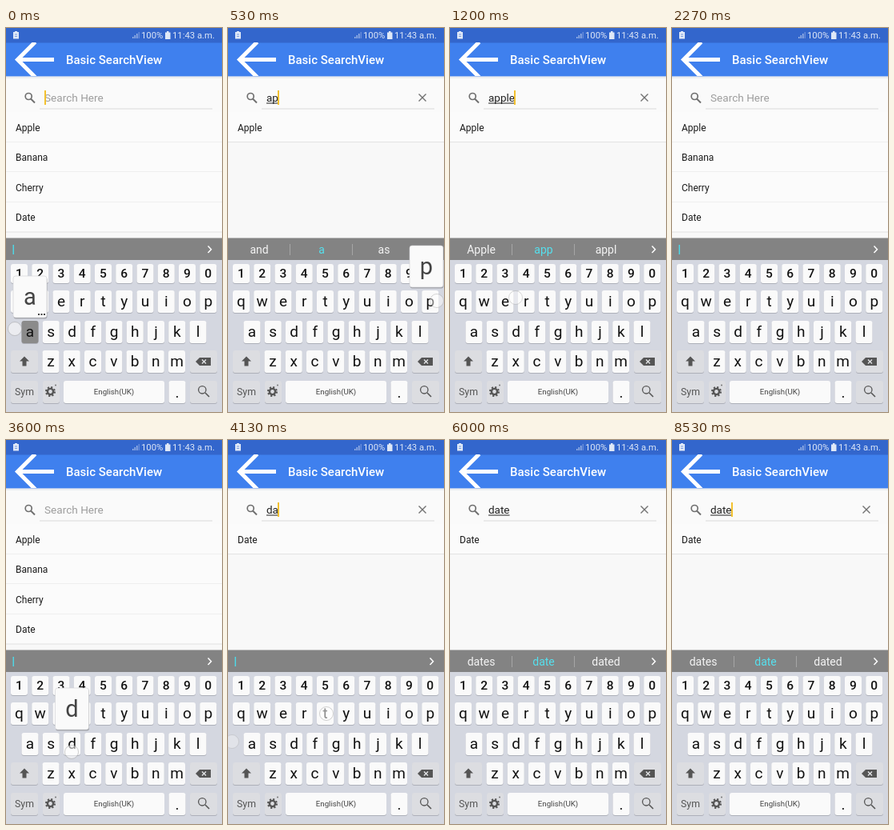
Write an HTML page that moves like this. It is 270 by 480 pixels and loops after 8790 ms.

```html
<!DOCTYPE html>
<html lang="en">
<head>
<meta charset="utf-8">
<title>Basic SearchView</title>
<style>
  html, body { margin: 0; width: 100%; height: 100%; overflow: hidden; background: #fafafa; }
  svg { display: block; width: 270px; height: 480px; font-family: Roboto, sans-serif; }
  .mid { text-anchor: middle; }
  .line { fill: none; stroke-linecap: butt; }
</style>
</head>
<body>
<svg id="stage" viewBox="0 0 270 480">
  <rect width="270" height="480" fill="#f8f8f8"/>
  <rect y="60" width="270" height="82" fill="#fafafa"/>
  <g id="rows" font-size="12" fill="#1c1c1c"></g>

  <rect y="60" width="270" height="1" fill="#a9c2ee"/>
  <rect y="61" width="270" height="2" fill="#eceef1"/>
  <rect y="18" width="270" height="42" fill="#3f80ee"/>
  <rect width="270" height="18.500" fill="#3366cc"/>
  <path class="line" d="M36.500 17.500 L14.500 39.500 L36.500 61.500 M14.500 39.500 H60" stroke="#fff" stroke-width="5" clip-path="url(#bar)"/>
  <clipPath id="bar"><rect y="18" width="270" height="42"/></clipPath>
  <text x="75" y="45" font-size="15" font-weight="500" fill="#fff">Basic SearchView</text>

  <g fill="#dfe8f7" font-size="11.3">
    <path d="M9 5h2v-1h3v1h2v8.500h-7z"/>
    <path d="M11 8h3M11 10.500h3" stroke="#7f9fdf"/>
    <g opacity=".6">
      <path d="M158 13v-2h1.500v2zM160.500 13v-4h1.500v4zM163 13v-6h1.500v6z"/>
      <path d="M165.500 13v-8h1.500v8z" opacity=".5"/>
    </g>
    <text x="169" y="12.700">100%</text>
    <path d="M199 5.500h2v-1.500h2.500v1.500h2v8.500h-6.500z"/>
    <text x="208" y="12.700">11:43 a.m.</text>
  </g>

  <g class="line" stroke="#707070" stroke-width="1.7">
    <circle cx="28.200" cy="85.500" r="4"/>
    <path d="M31 88.500 L36 93.500" stroke-width="2"/>
    <path id="clear" d="M238.500 82.500l9 9m0-9l-9 9" stroke-width="1.400"/>
  </g>
  <rect x="42" y="100.500" width="216" height="1" fill="#dcdcdc"/>
  <text id="hint" x="48" y="92" font-size="13.6" fill="#9d9d9d">Search Here</text>
  <text id="query" x="48" y="92" font-size="13.5" fill="#222"></text>
  <rect id="under" x="48" y="93.500" height="1" fill="#222"/>
  <rect id="caret" y="78" width="2" height="18" fill="#f3c12f"/>

  <rect y="262.500" width="270" height="28" fill="#838383"/>
  <rect id="mark" x="8.500" y="271" width="1.500" height="12" fill="#4fd6e4"/>
  <g id="words" font-size="14" fill="#f4f4f4" class="mid">
    <path d="M77.500 270v14M155.500 270v14" stroke="#a5a5a5"/>
    <text x="39" y="282"></text>
    <text x="117" y="282" fill="#55e0ee"></text>
    <text x="195" y="282"></text>
  </g>
  <path class="line" d="M252.500 272.500l4 4.200-4 4.200" stroke="#fff" stroke-width="1.500"/>
  <rect y="290" width="270" height="190" fill="#d4d7e0"/>
  <g id="keys"></g>

  <g id="popup">
    <rect x=".5" y="1.500" width="42" height="52" rx="3" fill="#000" opacity=".25"/>
    <rect width="42" height="52" rx="3" fill="#fafafa" stroke="#cfcfd2" stroke-width=".6"/>
    <text class="mid" x="21" y="36" font-size="29" fill="#444"></text>
    <path id="dots" d="M31 48h2m1.500 0h2m1.500 0h2" stroke="#444" stroke-width="2"/>
  </g>
  <circle id="touch" r="8.500" fill="#fff" fill-opacity=".55" stroke="#9a9a9a" stroke-opacity=".6" stroke-width=".8"/>
  <circle id="trail" cx="5" cy="377" r="8.500" fill="#fff" fill-opacity=".3" stroke="#9a9a9a" stroke-opacity=".35" stroke-width=".8"/>
</svg>
<script>
const LOOP = 8790, PITCH = 26.25;
const $ = id => document.getElementById(id);

function add(parent, tag, attrs, text = '') {
  const el = document.createElementNS('http://www.w3.org/2000/svg', tag);
  for (const name in attrs) el.setAttribute(name, attrs[name]);
  el.textContent = text;
  parent.append(el);
  return el;
}

// Keyboard
const keys = {};
function key(label, cx, top, { w = 21, h = 28, size = 19, dy = 19.5, fill = '#fafafa', ink = '#111', weight = 400 } = {}) {
  const box = { x: cx - w / 2, width: w, height: h, rx: 3 };
  add($('keys'), 'rect', { ...box, y: top + 1, fill: '#adb0b9' });
  const face = add($('keys'), 'rect', { ...box, y: top, fill });
  add($('keys'), 'text', {
    class: 'mid', x: cx, y: top + dy, 'font-size': size, 'font-weight': weight, fill: ink
  }, label);
  keys[label] = { cx, top, face };
}
function keyRow(labels, x, top, style) {
  [...labels].forEach((c, i) => key(c, x + i * PITCH, top, style));
}
const grey = { fill: '#dcdde1', ink: '#555' };
keyRow('1234567890', 16.5, 295, { h: 24, size: 15.5, dy: 17, weight: 500 });
keyRow('qwertyuiop', 16.5, 328);
keyRow('asdfghjkl', 30, 366);
keyRow('zxcvbnm', 56, 403);
key('', 23, 403, { w: 34, ...grey });
key('', 247, 403, { w: 34, ...grey });
key('Sym', 23, 441, { w: 34, size: 12.3, dy: 17.5, ...grey });
key('', 56.5, 441, grey);
key('English(UK)', 135, 441, { w: 126, size: 9.7, dy: 17, ink: '#444' });
key('.', 214, 441, { dy: 20.5 });
key('', 247, 441, { w: 34, ...grey });

const icon = (d, attrs) => add($('keys'), 'path', { d, fill: 'none', stroke: '#555', ...attrs });
icon('M23 410.500l6 6h-3.500v6h-5v-6h-3.500z', { fill: '#555', stroke: 'none' });
icon('M237 417l5-5h14v10h-14z', { fill: '#555', stroke: 'none' });
icon('M245 414.500l5 5m0-5l-5 5', { stroke: '#e4e5e8', 'stroke-width': 1.3 });
icon('M249 456l5 5', { 'stroke-width': 1.6 });
const ring = (cx, cy, r, attrs) => add($('keys'), 'circle', { cx, cy, r, fill: 'none', stroke: '#555', ...attrs });
ring(245.3, 452.3, 4.7, { 'stroke-width': 1.3 });
ring(55.5, 454.5, 3.6, { 'stroke-width': 2.4 });
ring(55.5, 454.5, 5.5, { 'stroke-width': 2, 'stroke-dasharray': 2.16 });
ring(62, 446.5, 1, { fill: '#777', stroke: 'none' });

// Result rows, filtered by prefix
const fruits = ['Apple', 'Banana', 'Cherry', 'Date'];
function showRows(query) {
  $('rows').replaceChildren();
  fruits.filter(f => f.toLowerCase().startsWith(query)).forEach((f, i) => {
    const y = 105 + i * 37.5;
    add($('rows'), 'rect', { y, width: 270, height: 37, fill: '#fbfbfb' });
    add($('rows'), 'rect', { y: y + 37, width: 270, height: 1, fill: '#e3e3e3' });
    add($('rows'), 'text', { x: 12, y: y + 23.5 }, f);
  });
}

// Timelines: [start, value]
const typed = [[0, ''], [200, 'a'], [500, 'ap'], [800, 'app'], [1000, 'appl'], [1150, 'apple'],
  [1930, ''], [3730, 'd'], [4000, 'da'], [4330, 'dat'], [4600, 'date']];
const hints = [[0, ''], [330, 'and a as'], [870, 'Apple app appl'], [1470, 'apples apple applied'],
  [2230, ''], [4400, 'day da days'], [4730, 'dates date dated']];
const blink = [0, 1600, 1930, 2230, 2800, 3270, 3670, 5200, 5670, 6000, 6270, 6800, 7270, 7800, 8330];

// Taps: label, down, popup gone, touch gone, x, y
const taps = [
  ['a', 0, 130, 200, 11, 376], ['p', 470, 600, 670, 261, 341], ['p', 730, 860, 900, 258, 341],
  ['l', 930, 1070, 1100, 240, 380], ['e', 1100, 1190, 1330, 82, 337], ['', 1800, 1800, 1960, 240, 87],
  ['d', 3600, 3730, 3800, 82, 390], ['a', 3870, 4000, 4100, 7, 377],
  ['t', 4110, 4110, 4330, 123, 342], ['e', 4520, 4620, 4720, 70, 339]
];

const at = (line, t) => line.findLast(([start]) => start <= t)[1];
const show = (el, on) => el.setAttribute('visibility', on ? 'visible' : 'hidden');
let lastQuery = null, lastWords = null;

function drawQuery(query) {
  if (query === lastQuery) return;
  lastQuery = query;
  $('query').textContent = query;
  const width = query ? $('query').getComputedTextLength() : 0;
  $('under').setAttribute('width', width);
  $('caret').setAttribute('x', Math.floor(48 + width));
  show($('hint'), !query);
  show($('clear'), query);
  showRows(query);
}

function drawWords(words) {
  if (words === lastWords) return;
  lastWords = words;
  const list = words.split(' ');
  $('words').querySelectorAll('text').forEach((el, i) => el.textContent = list[i] || '');
  show($('words'), words);
  show($('mark'), !words);
}

function drawTap(t) {
  const tap = taps.find(([, down, , gone]) => t >= down && t < gone);
  const popup = tap && t < tap[2];
  const onA = popup && tap[0] === 'a';
  show($('touch'), tap);
  show($('popup'), popup);
  show($('dots'), onA);
  keys.a.face.setAttribute('fill', onA ? '#8b8b8b' : '#fafafa');
  if (!tap) return;
  const [label, down, , gone, x, y] = tap;
  $('touch').setAttribute('cx', x);
  $('touch').setAttribute('cy', y);
  $('touch').setAttribute('opacity', 1 - .5 * (t - down) / (gone - down));
  if (popup) {
    const { cx, top } = keys[label];
    const left = Math.max(1, Math.min(227, cx - 21));
    $('popup').setAttribute('transform', `translate(${left} ${top - 56})`);
    $('popup').querySelector('text').textContent = label;
  }
}

function frame(now) {
  const t = now % LOOP;
  drawQuery(at(typed, t));
  drawWords(at(hints, t));
  drawTap(t);
  show($('caret'), blink.filter(b => b <= t).length % 2);
  show($('trail'), t >= 4100 && t < 4200);
}

const start = performance.now();
function tick() {
  frame(performance.now() - start);
  requestAnimationFrame(tick);
}
tick();
</script>
</body>
</html>
```
